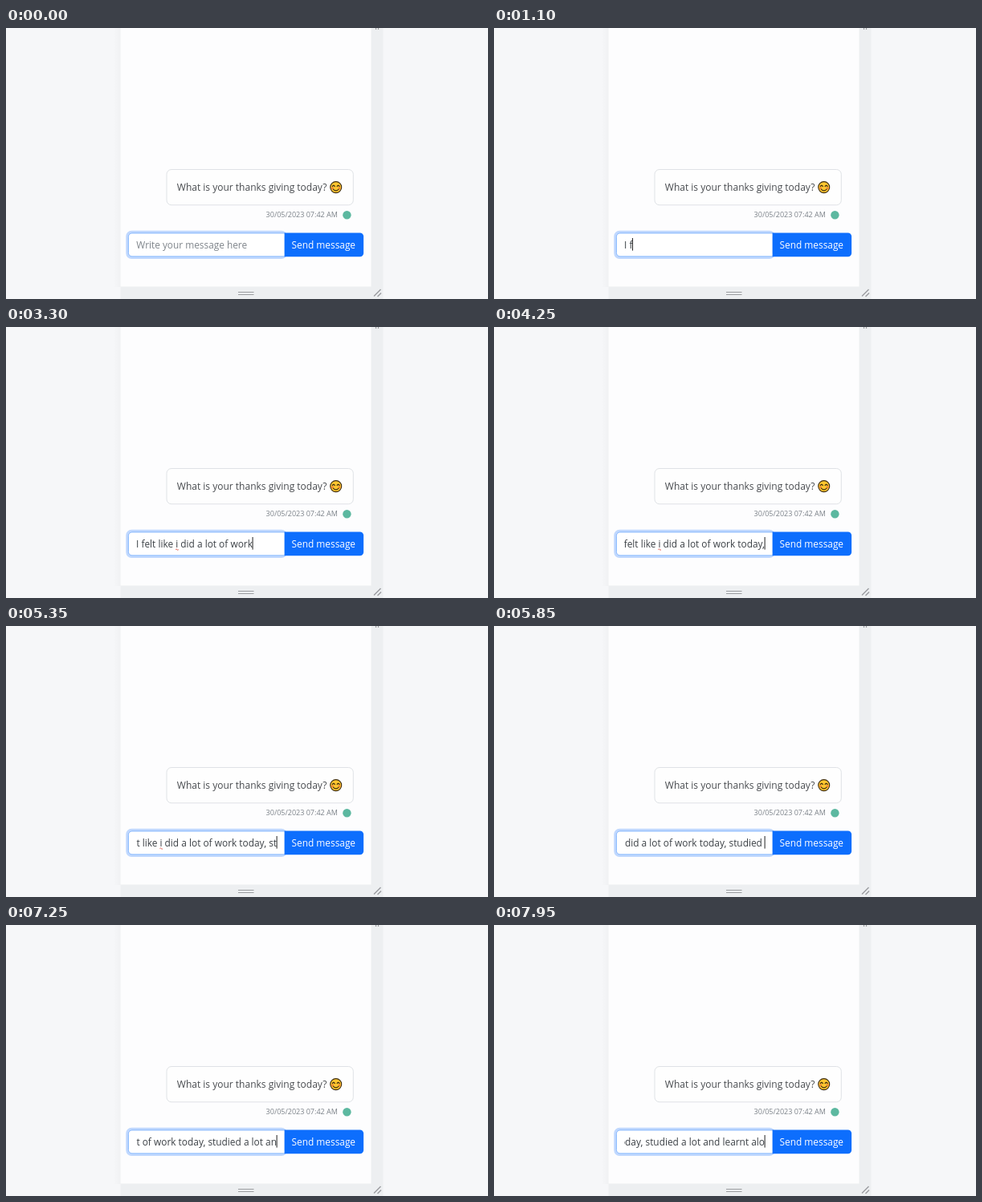
An HTML page that plays this animation: 600 px wide and 338 px high, repeating every 8 s.

```html
<!DOCTYPE html>
<html lang="en">
<head>
<meta charset="utf-8">
<title>Chat message</title>
<style>
  html, body { margin: 0; width: 100%; height: 100%; overflow: hidden; background: #f6f7f9; }
  svg { display: block; font-family: "Open Sans", "Noto Sans", sans-serif; }
  .message { font-size: 12px; fill: #484b4f; }
  .date { font-size: 9px; fill: #7b8188; }
  .field { font-size: 11.9px; fill: #3c4146; }
  .hint { font-size: 11.85px; fill: #7f858b; }
  .button { font-size: 11.85px; fill: #fff; }
  .grip { stroke: #9b9da0; fill: none; }
</style>
</head>
<body>
<svg width="600" height="338" viewBox="0 0 600 338">
  <defs>
    <linearGradient id="shade">
      <stop offset="0" stop-color="#f6f7f9"/>
      <stop offset="1" stop-color="#f0f1f3"/>
    </linearGradient>
    <clipPath id="inner"><rect x="162" y="258" width="176" height="25"/></clipPath>
  </defs>

  <rect width="600" height="338" fill="#f6f7f9"/>
  <rect x="134" width="9" height="323" fill="url(#shade)"/>
  <rect x="142.5" width="327" height="338" fill="#edeff1"/>
  <rect x="142.5" width="312" height="322.5" fill="#fdfdfe"/>

  <path class="grip" d="M289 329.5h19.5M289 332.5h19.5" stroke-width="1.2"/>
  <path class="grip" d="M458 334.5l8.5-8.5M462.5 335l4.5-4.5" stroke-width="1.4"/>
  <path class="grip" d="M460.5 0v2M463.5 0v2" stroke-width="1.2"/>

  <rect x="200" y="176.5" width="232.3" height="44.3" rx="6" fill="#fefefe" stroke="#dfe2e6"/>
  <text class="message" x="212.8" y="203">What is your thanks giving today?</text>
  <g transform="translate(410.7 198.6)" fill="none" stroke="#3d2d12" stroke-linecap="round">
    <circle r="7" fill="#fdc62f" stroke-width="1.1"/>
    <g fill="#f3883a" stroke="none"><circle cx="-4.4" cy="1.2" r="1.5"/><circle cx="4.4" cy="1.2" r="1.5"/></g>
    <path d="M-4.4 -1q1.5 -2.4 3 0M1.4 -1q1.5 -2.4 3 0M-3.4 2.5q3.4 3.4 6.8 0" stroke-width="1.1"/>
  </g>
  <text class="date" x="323.6" y="236.2">30/05/2023 07:42 AM</text>
  <circle cx="424.4" cy="233.3" r="5.2" fill="#5cb8a0"/>

  <rect x="149.3" y="252.8" width="200.5" height="35.2" rx="7" fill="#c0d8fe"/>
  <rect x="152.4" y="255.9" width="198" height="29" rx="4.5" fill="#fff" stroke="#86b7fe"/>
  <path d="M346.6 255.5h94a4.5 4.5 0 0 1 4.5 4.5v20.8a4.5 4.5 0 0 1-4.5 4.5h-94z" fill="#0d6efd"/>
  <text class="button" x="395.3" y="274.8" text-anchor="middle">Send message</text>

  <g clip-path="url(#inner)">
    <text id="hint" class="hint" x="162.3" y="274.8">Write your message here</text>
    <g id="line">
      <text id="typed" class="field" y="274.8"></text>
      <path id="squiggle" fill="none" stroke="#e2574c" stroke-width="1" d="M0 277.6q.9 -1.4 1.8 0t1.8 0"/>
      <rect id="caret" y="262" width="1" height="15.6" fill="#222"/>
    </g>
  </g>
</svg>
<script>
const LOOP = 8000, LEFT = 162, ROOM = 175, BLINK = 250;

// Bursts of typing: start, time per key, keys ("<" is backspace)
const bursts = [
  [100, 150, "I "],
  [1000, 0, "f"],
  [1300, 80, "elt like i "],
  [2250, 62.5, "did a lot of "],
  [3100, 55, "work today"],
  [3800, 0, " "],
  [4050, 150, "<,"],
  [4650, 0, " "],
  [4850, 400, "st"],
  [5400, 50, "udied"],
  [5750, 175, " alot"],
  [6550, 50, " <<<<"],
  [6800, 75, " lot an"],
  [7325, 75, "d "],
  [7450, 55, "learnt alo"]
];
const keys = bursts.flatMap(([start, step, text]) =>
  [...text].map((key, i) => ({ at: start + i * step, key })));

const [hint, line, typed, squiggle, caret] =
  ["hint", "line", "typed", "squiggle", "caret"].map(id => document.getElementById(id));
const show = (el, on) => el.setAttribute("visibility", on ? "visible" : "hidden");

function typedAt(t) {
  let text = "", last = 0;
  for (const { at, key } of keys) {
    if (at > t) break;
    text = key === "<" ? text.slice(0, -1) : text + key;
    last = at;
  }
  return { text, last };
}

function draw(t) {
  const { text, last } = typedAt(t);
  typed.textContent = text.replace(/ /g, "\u00a0");
  const width = text ? typed.getComputedTextLength() : 0;
  line.setAttribute("transform", `translate(${LEFT + Math.min(0, ROOM - width)} 0)`);
  caret.setAttribute("x", width - 0.4);

  const word = text.indexOf(" i ") + 1;
  if (word) {
    const x = typed.getStartPositionOfChar(word).x;
    squiggle.setAttribute("transform", `translate(${x} 0)`);
  }
  show(squiggle, word > 0);
  show(hint, !text);
  show(caret, text && (t - last) % (2 * BLINK) < BLINK);
}

const begin = performance.now();
function tick() {
  draw((performance.now() - begin) % LOOP);
  requestAnimationFrame(tick);
}
tick();
</script>
</body>
</html>
```
